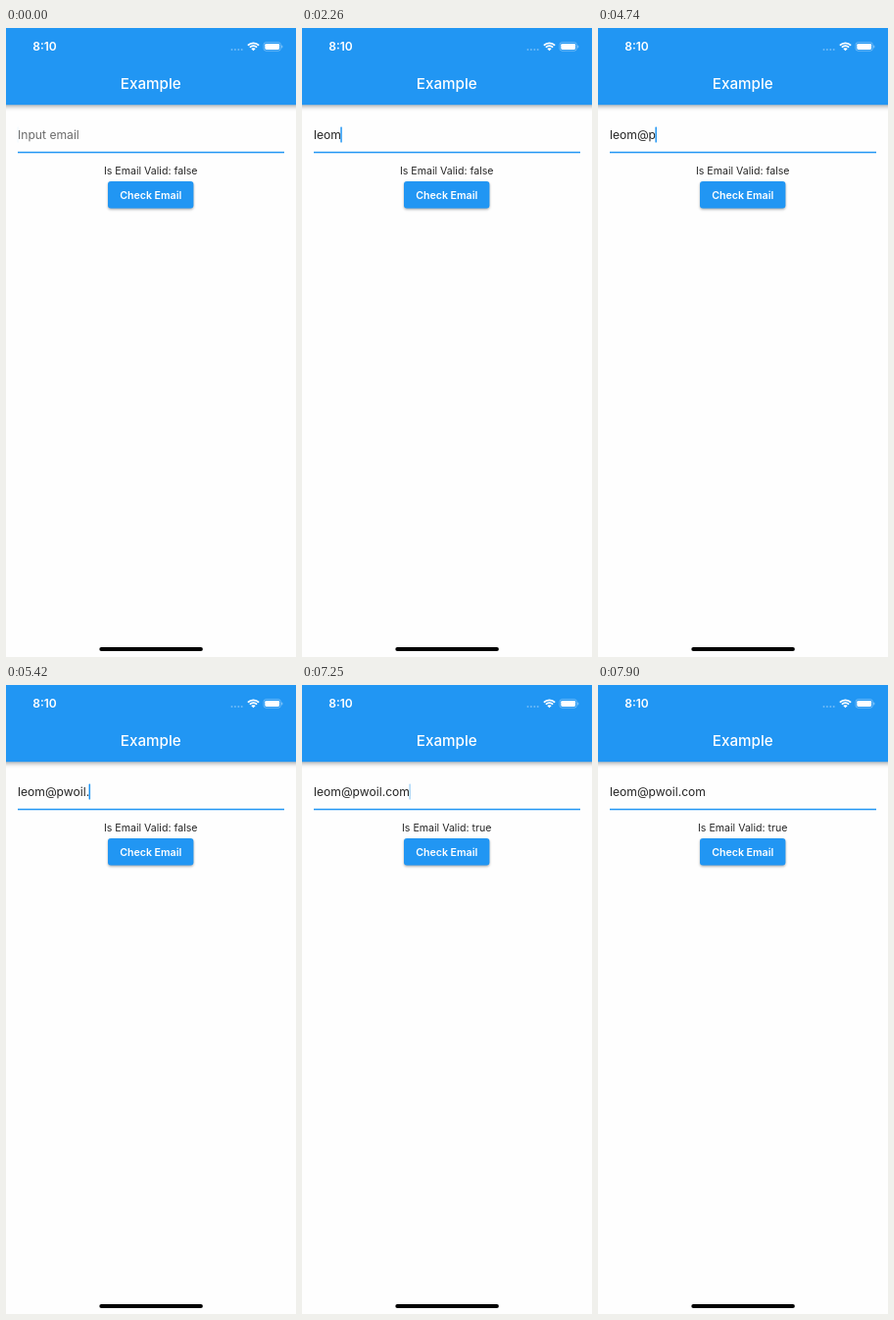
These frames come from a looping animation (296x640 px, 8000 ms). An HTML page with a canvas:

```html
<!DOCTYPE html>
<html lang="en">
<head>
<meta charset="utf-8">
<title>Example</title>
<style>
  html, body { margin: 0; width: 100%; height: 100%; overflow: hidden; background: #fefefe; }
  canvas { display: block; width: 296px; height: 640px; }
</style>
</head>
<body>
<canvas id="stage"></canvas>
<script>
const W = 296, H = 640, LOOP = 8000;
const BLUE = '#2196f3', PAPER = '#fefefe', INK = '#262626';
const FONT = 'Inter, Roboto, sans-serif';

// Typing happens in short bursts with an even rhythm.
const BURSTS = [
  { keys: 'leom', start: 1550, step: 236 },
  { keys: '@', start: 2630, step: 0 },
  { keys: 'pwo', start: 4740, step: 60 },
  { keys: 'il.', start: 5000, step: 210 },
  { keys: 'com', start: 5750, step: 130 },
];
const FIRST_KEY = 1550, VALID_AT = 5750, TAP_AT = 7370;
const BLINK = { last: -1170, delay: 640, period: 520, fade: 210 };

const canvas = document.getElementById('stage');
const ctx = canvas.getContext('2d');
const ratio = window.devicePixelRatio || 1;
canvas.width = W * ratio;
canvas.height = H * ratio;

const clamp = x => Math.min(1, Math.max(0, x));

function typing(t) {
  let value = '', last = BLINK.last;
  for (const { keys, start, step } of BURSTS) {
    [...keys].forEach((key, i) => {
      const time = start + i * step;
      if (t < time) return;
      value += key;
      last = time;
    });
  }
  return { value, last };
}

// The caret stays solid after a key, then fades out and in by turns.
function caretAlpha(idle) {
  const since = idle - BLINK.delay;
  if (since < 0) return 1;
  const turn = Math.floor(since / BLINK.period);
  const fade = clamp((since % BLINK.period) / BLINK.fade);
  return turn % 2 ? fade : 1 - fade;
}

function tapGlow(t) {
  const age = t - TAP_AT;
  return 0.12 * clamp(age / 100) * clamp((530 - age) / 400);
}

function text(str, x, y, size, color, weight = 400, align = 'left') {
  ctx.font = `${weight} ${size}px ${FONT}`;
  ctx.textAlign = align;
  ctx.fillStyle = color;
  ctx.fillText(str, x, y);
}

function pill(x, y, w, h, r, color) {
  ctx.fillStyle = color;
  ctx.beginPath();
  ctx.roundRect(x, y, w, h, r);
  ctx.fill();
}

function withShadow(blur, dy, alpha, draw) {
  ctx.save();
  ctx.shadowColor = `rgba(0,0,0,${alpha})`;
  ctx.shadowBlur = blur * ratio;
  ctx.shadowOffsetY = dy * ratio;
  draw();
  ctx.restore();
}

function drawWifi(x, y) {
  ctx.save();
  ctx.beginPath();
  ctx.moveTo(x, y);
  ctx.arc(x, y, 12, -Math.PI * 0.755, -Math.PI * 0.245);
  ctx.clip();
  ctx.strokeStyle = '#fff';
  ctx.lineWidth = 1.8;
  for (const r of [7.9, 5.1]) {
    ctx.beginPath();
    ctx.arc(x, y, r, Math.PI, 0);
    ctx.stroke();
  }
  ctx.fillStyle = '#fff';
  ctx.beginPath();
  ctx.arc(x, y, 3, 0, Math.PI * 2);
  ctx.fill();
  ctx.restore();
}

function drawStatus() {
  text('8:10', 39.5, 23.2, 12, '#fff', 600, 'center');
  for (let i = 0; i < 4; i++) pill(229.5 + i * 3.4, 21, 2, 2, 1, 'rgba(255,255,255,0.35)');
  drawWifi(252.5, 23.2);
  ctx.strokeStyle = 'rgba(255,255,255,0.4)';
  ctx.lineWidth = 0.8;
  ctx.beginPath();
  ctx.roundRect(263, 14.6, 17.4, 8.6, 2.5);
  ctx.stroke();
  pill(264.3, 15.9, 14.8, 6, 1.4, '#fff');
  pill(281.2, 17.4, 1.1, 3, 0.6, 'rgba(255,255,255,0.45)');
}

function drawHeader() {
  withShadow(4.5, 1.5, 0.32, () => {
    ctx.fillStyle = BLUE;
    ctx.fillRect(-10, -10, W + 20, 88.2);
  });
  drawStatus();
  text('Example', 147.8, 62.4, 15.2, '#fff', 500, 'center');
}

function drawField(t) {
  const { value, last } = typing(t);
  ctx.globalAlpha = 1 - clamp((t - FIRST_KEY) / 200);
  text('Input email', 12, 112.9, 12.14, '#6c6c6c');
  ctx.globalAlpha = 1;
  text(value, 12, 112.9, 12.14, INK);
  const end = 12 + ctx.measureText(value).width;
  ctx.globalAlpha = caretAlpha(t - last);
  pill(end - 0.6, 100.4, 1.5, 16.2, 0.7, BLUE);
  ctx.globalAlpha = 1;
  ctx.fillStyle = BLUE;
  ctx.fillRect(12, 125.8, 272, 1.5);
}

function drawButton(t) {
  const box = [104, 156, 87.4, 27.6, 3];
  withShadow(2.6, 1.2, 0.32, () => pill(...box, BLUE));
  pill(...box, `rgba(255,255,255,${tapGlow(t)})`);
  text('Check Email', 147.7, 173.6, 10.6, '#fff', 600, 'center');
}

function draw(t) {
  ctx.setTransform(ratio, 0, 0, ratio, 0, 0);
  ctx.fillStyle = PAPER;
  ctx.fillRect(0, 0, W, H);
  drawHeader();
  drawField(t);
  text(`Is Email Valid: ${t >= VALID_AT}`, 147.7, 148.8, 10.6, INK, 400, 'center');
  drawButton(t);
  pill(95.3, 630, 105.6, 4, 2, '#000');
}

const begin = performance.now();
function tick() {
  draw((performance.now() - begin) % LOOP);
  requestAnimationFrame(tick);
}
tick();
</script>
</body>
</html>
```
